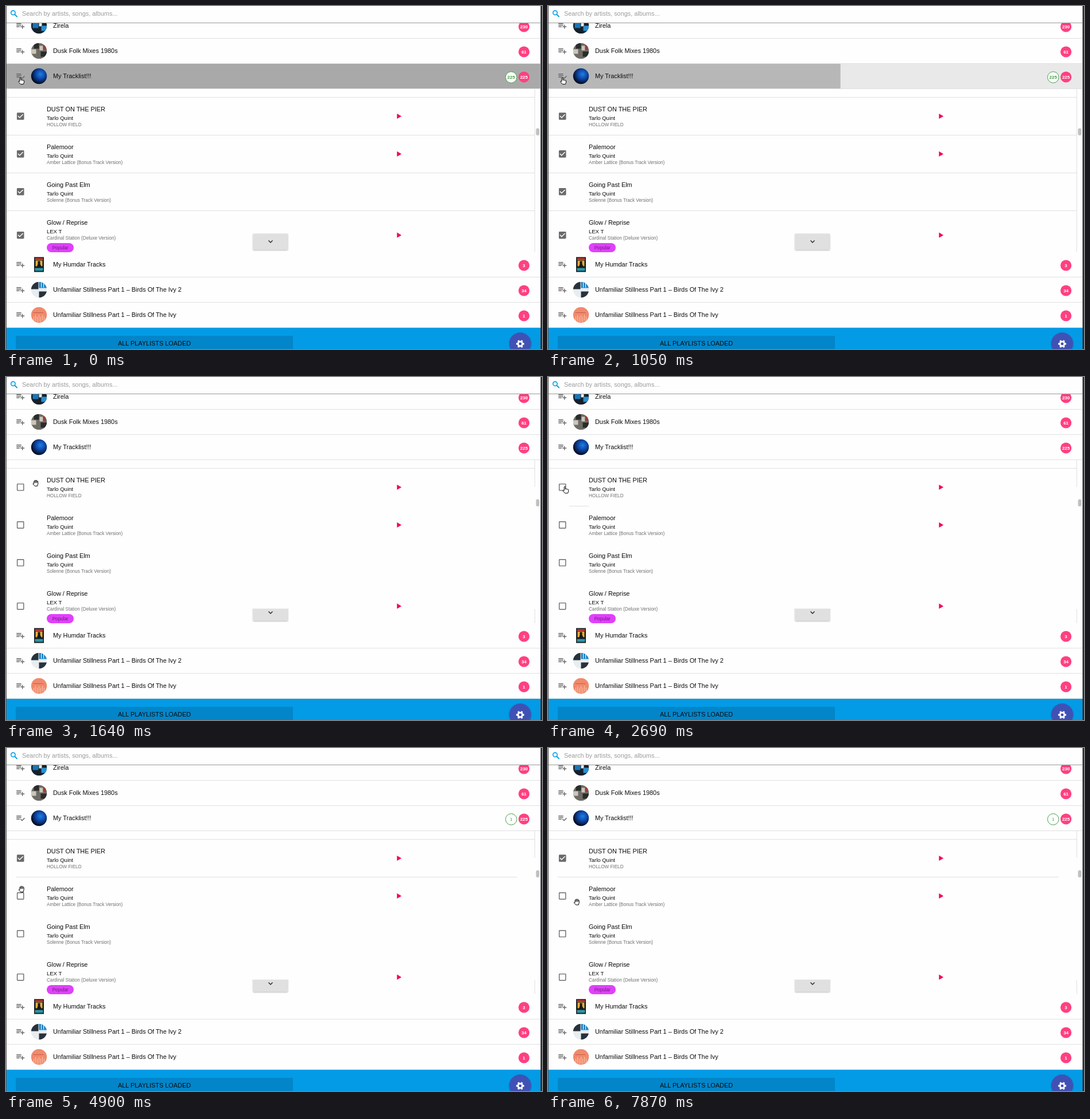
Animation, 934 px wide and 599 px high, one loop 8000 ms. Source, as an HTML page:

```html
<!DOCTYPE html>
<html lang="en">
<head>
<meta charset="utf-8">
<title>Playlist selection</title>
<style>
  html, body { margin: 0; width: 100%; height: 100%; overflow: hidden; background: #fefefe; }
  svg { display: block; width: 934px; height: 599px; }
  text { font-family: "Liberation Sans", Arial, sans-serif; font-size: 10.9px; fill: #0c0c0c; }
  .artist { font-size: 9.5px; }
  .album { font-size: 8.13px; fill: #707070; }
  .count { font-size: 8px; font-weight: bold; fill: #fff; text-anchor: middle; }
  .picked { font-size: 8px; fill: #43a047; text-anchor: middle; }
  .hint { fill: #9b9b9b; }
  .line { fill: #e0e0e0; }
  .icon { fill: #6a6a6a; }
</style>
</head>
<body>
<svg viewBox="0 0 934 599">
  <defs>
    <clipPath id="disc"><circle r="13.7"/></clipPath>
    <radialGradient id="night" cx=".6" cy=".38" r=".6">
      <stop offset="0" stop-color="#1f7fe6"/><stop offset=".45" stop-color="#0f4cae"/><stop offset="1" stop-color="#050d26"/>
    </radialGradient>
    <filter id="soft" x="-20%" y="-20%" width="140%" height="150%">
      <feDropShadow dx="0" dy="1" stdDeviation=".8" flood-opacity=".35"/>
    </filter>
    <path id="add" transform="scale(.7)" d="M14 10H2v2h12zM14 6H2v2h12zM18 14v-4h-2v4h-4v2h4v4h2v-4h4v-2zM2 16h8v-2H2z"/>
    <path id="done" transform="scale(.7)" d="M14 10H2v2h12zM14 6H2v2h12zM2 16h8v-2H2zM21.5 11.5L23 13l-7 7-4.5-4.5L13 14l3 3z"/>
    <path id="box" transform="scale(.7)" d="M19 5v14H5V5zm0-2H5a2 2 0 0 0-2 2v14a2 2 0 0 0 2 2h14a2 2 0 0 0 2-2V5a2 2 0 0 0-2-2z"/>
    <path id="ticked" transform="scale(.7)" d="M19 3H5a2 2 0 0 0-2 2v14a2 2 0 0 0 2 2h14a2 2 0 0 0 2-2V5a2 2 0 0 0-2-2zm-9 14l-5-5 1.4-1.4 3.6 3.6 7.6-7.6L19 8z"/>
  </defs>

  <rect width="934" height="599" fill="#fefefe"/>
  <rect id="hover" x="1" y="101" width="930" height="44" fill="#e9e9e9"/>
  <rect id="ripple" x="1" y="101" height="44"/>
  <g id="tracks"></g>
  <g class="line">
    <rect id="topLine" x="1" y="159" width="920" height="1"/>
    <rect id="midLine" y="225" height="1"/>
    <path id="lowLines" d="M1 291h920v1H1zM1 357h920v1H1z"/>
    <rect id="edge" x="921" y="145" width="1"/>
    <rect x="921" y="405" width="1" height="25"/>
  </g>

  <rect x="430.5" y="397.5" width="60.5" height="28" rx="1" fill="#e0e0e0" filter="url(#soft)"/>
  <rect id="buttonCut" x="427" y="394" width="68" height="10.5" fill="#fefefe"/>
  <path d="M457.5 409.5l3.5 3.5 3.5-3.5" fill="none" stroke="#222" stroke-width="1.4"/>

  <g id="rows"></g>
  <g id="picked">
    <circle cx="880.3" cy="124.5" r="9.8" fill="#fefefe" stroke="#43a047"/>
    <text id="pickedCount" class="picked" x="880.3" y="127.4"></text>
  </g>

  <rect x="923.5" y="213.5" width="6" height="12.5" rx="3" fill="#c1c1c1"/>

  <rect width="934" height="30" fill="#fefefe"/>
  <rect y="29" width="931" height="1" fill="#999"/>
  <g fill="none" stroke="#0a9fe6" stroke-width="1.6"><circle cx="12.4" cy="11.8" r="3.7"/><path d="M15 14.5l4.6 4.6" stroke-width="2"/></g>
  <text class="hint" x="28" y="16.5">Search by artists, songs, albums...</text>

  <rect y="562" width="932" height="37" fill="#039be5"/>
  <rect x="17" y="576" width="483" height="23" fill="#0385c9"/>
  <text x="258.5" y="592.7" text-anchor="middle">ALL PLAYLISTS LOADED</text>
  <circle cx="896" cy="589.3" r="19" fill="#3f51b5" filter="url(#soft)"/>
  <g fill="none" stroke="#fff" transform="translate(896 590)">
    <circle r="3.9" stroke-width="2.9"/>
    <circle r="6" stroke-width="2" pathLength="12" stroke-dasharray="1 1" stroke-dashoffset=".5"/>
  </g>
  <rect width="1" height="599" fill="#555"/>
  <rect x="931.5" width="2.5" height="599" fill="#2b2b2f"/>

  <g id="cursor" fill="#fff" stroke="#000" stroke-linejoin="round">
    <path id="pointer" d="M3 7.5V1.6a1 1 0 0 1 2 0V5q1-.8 2 .2 1-.7 1.9.4 1.5-.4 1.6 1V9l-1.2 3.3H4.5L.8 8.2Q.6 6.7 2 7z"/>
    <path id="hand" d="M2.6 7V3q.8-1.4 1.7 0V2q.9-1.4 1.8 0 .9-1.2 1.8.2v1q1-.9 1.8.3v4L8.7 11.5H4.2L.8 7.6q.5-1.6 1.8-.2zM4.3 3v3M6.1 2v4M7.9 3v3"/>
  </g>
</svg>
<script>
const $ = id => document.getElementById(id);
const LOOP = 8000, TICK = 148.3;

const disc = shapes => `<g clip-path="url(#disc)">${shapes}</g>`;
const stripes = Array.from({ length: 7 }, (_, i) => `M${3 * i - 9} ${i % 2 ? 0 : 3}v${12 - i % 3}`).join('');
const covers = {
  band: disc('<path fill="#16202b" d="M-14-14h28v28h-28z"/><path fill="#1976b8" d="M-11-9H-1V4h-10z"/><path fill="#e9eef0" d="M0-8h5v9H0z"/><path fill="#2a91cf" d="M4 0h10v9H4z"/>'),
  punk: disc('<path fill="#6f6c66" d="M-14-14h28v28h-28z"/><path fill="#c9c6bc" d="M-14-3h9v8h-9zM1-9h6v8H1z"/><path fill="#292c2a" d="M-9-14h9v10h-9zM3 1h11v9H3z"/><path fill="#9a4039" d="M7-10h5v8H7z"/>'),
  night: '<circle r="13.7" fill="url(#night)"/>',
  poster: '<path fill="#171b20" d="M-8.5-13h17v26h-17z"/><path fill="#d83c2e" d="M-7-11H7v3H-7z"/><path fill="#e8ad35" d="M-6-7H6V3H-6z"/><path fill="#171b20" d="M-2-6h4v5l3 6h-9l2-6z"/><path fill="#2b98a6" d="M-7 6H7v5H-7z"/>',
  collage: disc('<path fill="#e8edf0" d="M-14-14h28v28h-28z"/><path fill="#27323c" d="M-14-14h13v13h-13zM0 3h14v11H0z"/><path fill="#2386c7" d="M0-14h14v11H0z"/><path stroke="#fff" d="M4-13v9M8-12v8"/>'),
  coral: disc(`<path fill="#f08a6c" d="M-14-14h28v28h-28z"/><path stroke="#f8c5ad" d="${stripes}"/><path stroke="#c75f49" d="M-10-4H8"/>`)
};

const playlists = [
  ['Zirela', 230, 'band'],
  ['Dusk Folk Mixes 1980s', 61, 'punk'],
  ['My Tracklist!!!', 225, 'night'],
  ['My Humdar Tracks', 3, 'poster'],
  ['Unfamiliar Stillness Part 1 – Birds Of The Ivy 2', 34, 'collage'],
  ['Unfamiliar Stillness Part 1 – Birds Of The Ivy', 1, 'coral']
];
const tracks = [
  { title: 'DUST ON THE PIER', artist: 'Tarlo Quint', album: 'HOLLOW FIELD', playable: true },
  { title: 'Palemoor', artist: 'Tarlo Quint', album: 'Amber Lattice (Bonus Track Version)', playable: true },
  { title: 'Going Past Elm', artist: 'Tarlo Quint', album: 'Solenne (Bonus Track Version)' },
  { title: 'Glow / Reprise', artist: 'LEX T', album: 'Cardinal Station (Deluxe Version)', playable: true, popular: true }
];

const OPEN_ROW = 2, PANEL_HEIGHT = 285;

function drawPlaylist([name, count, cover], i) {
  const y = 34.5 + 44 * i + (i > OPEN_ROW ? PANEL_HEIGHT : 0);
  return `
    <use id="mark${i}" class="icon" href="#add" x="16.8" y="${y - 8.7}"/>
    <g transform="translate(57.5 ${y})">${covers[cover]}</g>
    <text x="82" y="${y + 3.5}">${name}</text>
    <circle cx="902.6" cy="${y + 1.5}" r="9.6" fill="#ff4081"/>
    <text class="count" x="902.6" y="${y + 4.4}">${count}</text>
    <rect class="line" x="1" y="${y + 21.5}" width="930" height="1"/>`;
}

function drawTrack({ title, artist, album, playable, popular }, i) {
  const y = 180 + 65.9 * i;
  const mid = y + (popular ? 22.5 : 12.5);
  return `
    <use id="check${i}" class="icon" href="#box" x="16.8" y="${mid - 8.4}"/>
    <text x="71" y="${y + 4}">${title}</text>
    <text class="artist" x="71" y="${y + 18.8}">${artist}</text>
    <text class="album" x="71" y="${y + 30.3}">${album}</text>
    ${playable ? `<path fill="#f50057" d="M681.3 ${mid - 4.6}v9.2l7.8-4.6z"/>` : ''}
    ${popular ? `<rect x="71" y="414" width="47" height="16" rx="8" fill="#e040fb"/>
    <text class="album" x="94.7" y="425" text-anchor="middle" style="fill:#6c1d7a">Popular</text>` : ''}`;
}

$('rows').innerHTML = playlists.map(drawPlaylist).join('');
$('tracks').innerHTML = tracks.map(drawTrack).join('');

const PRESS = 868, CLEAR = 1180, LEAVE = 1640, REPAINT = 1790;
const PICK_FIRST = 4160, PICK_SECOND = 5500, DROP_SECOND = 7270;

const moves = [
  { from: 1200, to: 1500, x: 27.5, y: 151 },
  { from: 1500, to: 1740, x: 60, y: 200 },
  { from: 1740, to: 2090, x: 56, y: 219 },
  { from: 2240, to: 2690, x: 25, y: 190.5 },
  { from: 2690, to: 2990, x: 20, y: 192 },
  { from: 4310, to: 5200, x: 22, y: 258 },
  { from: 5600, to: 6230, x: 35.5, y: 266.5 },
  { from: 6400, to: 6830, x: 22, y: 259 },
  { from: 7420, to: 7860, x: 44.5, y: 262.5 }
];

const clamp = p => Math.max(0, Math.min(1, p));
const smooth = p => p * p * (3 - 2 * p);
const set = (id, name, value) => $(id).setAttribute(name, value);
const show = (id, on) => set(id, 'visibility', on ? 'visible' : 'hidden');

function cursorAt(t) {
  return moves.reduce((pos, { from, to, x, y }) => {
    const p = smooth(clamp((t - from) / (to - from)));
    return { x: pos.x + (x - pos.x) * p, y: pos.y + (y - pos.y) * p };
  }, { x: 21, y: 124.3 });
}

function drawRow(t, stepped) {
  const spread = t < TICK ? 1 : clamp((stepped - PRESS) / 318);
  set('ripple', 'width', 24 + 906 * spread);
  set('ripple', 'opacity', .15 + .125 * spread);
  show('ripple', spread > 0 && t < LEAVE);
  show('hover', t < LEAVE);
}

function drawSelection(t) {
  const all = t < CLEAR;
  const ticks = [all || t >= PICK_FIRST, all || (t >= PICK_SECOND && t < DROP_SECOND), all, all];
  ticks.forEach((on, i) => set('check' + i, 'href', on ? '#ticked' : '#box'));

  const count = all ? 225 : ticks.filter(Boolean).length;
  $('pickedCount').textContent = count;
  $('pickedCount').style.fontWeight = all ? 'bold' : 'normal';
  show('picked', count > 0);
  set('mark' + OPEN_ROW, 'href', count ? '#done' : '#add');
}

// Lines vanish when the list is cleared and come back only where it repaints.
function drawLines(t) {
  const all = t < CLEAR;
  const [from, to] = all ? [1, 921] : t < REPAINT ? [0, 0] : t < PICK_FIRST ? [37, 71] : [17, 890];
  set('midLine', 'x', from);
  set('midLine', 'width', to - from);
  show('topLine', all || t >= LEAVE);
  show('lowLines', all);
  set('edge', 'height', all ? PANEL_HEIGHT : t < LEAVE ? 0 : 47);
  show('buttonCut', !all);
}

function drawCursor(stepped) {
  const { x, y } = cursorAt(stepped);
  const onRow = y < 140;
  const onCheckbox = x < 27 && ((y > 185 && y < 208) || y > 245);
  set('cursor', 'transform', `translate(${x} ${y})`);
  show('pointer', onRow || onCheckbox);
  show('hand', !onRow && !onCheckbox);
}

function draw(t) {
  const stepped = Math.floor(t / TICK) * TICK;
  drawRow(t, stepped);
  drawSelection(t);
  drawLines(t);
  drawCursor(stepped);
}

const start = performance.now();
function frame() {
  draw((performance.now() - start) % LOOP);
  requestAnimationFrame(frame);
}
frame();
</script>
</body>
</html>
```
